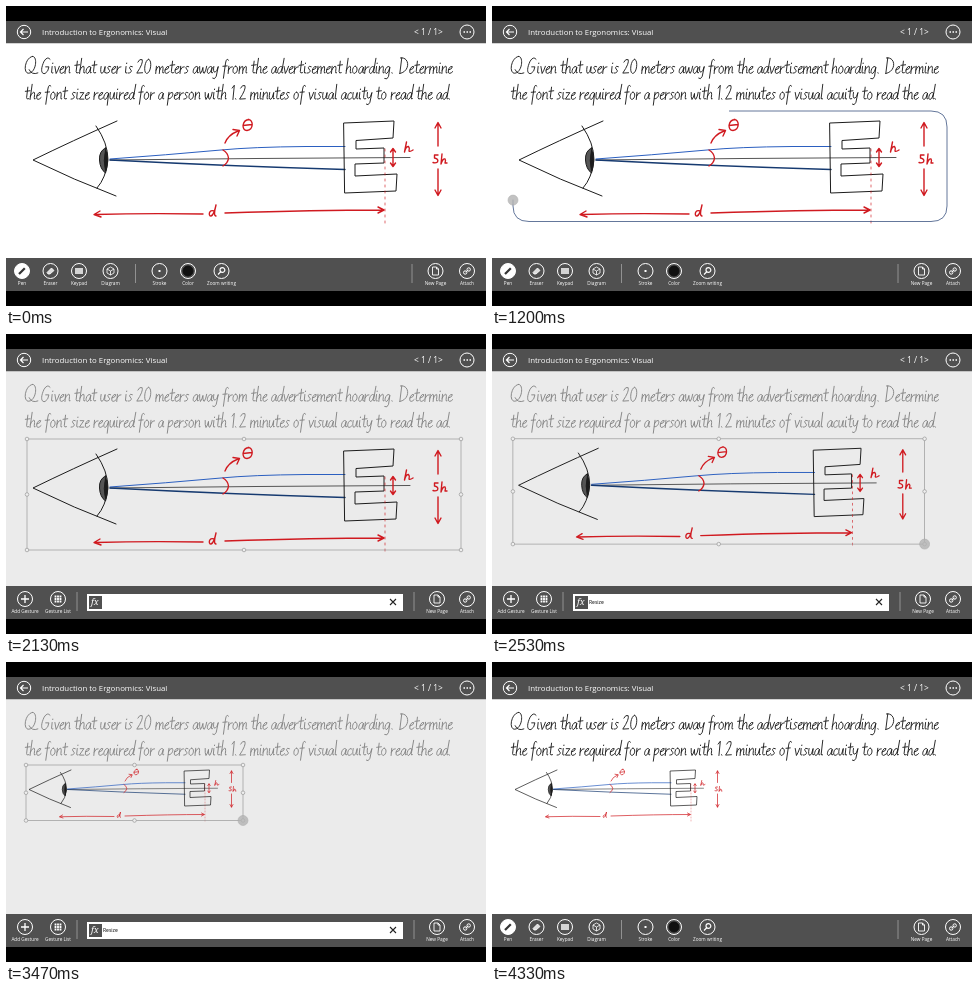
Recreate the animation shown at these times as an HTML page. Size 480 by 300 pixels, loop 4390 ms.

```html
<!DOCTYPE html>
<html lang="en">
<head>
<meta charset="utf-8">
<title>Ergonomics lesson</title>
<style>
html, body { margin: 0; height: 100%; overflow: hidden; background: #000; }
svg { display: block; width: 480px; height: 300px; font-family: "Open Sans", "Noto Sans", sans-serif; }
.ink { fill: none; stroke: #1c1c1c; stroke-linecap: round; stroke-linejoin: round; }
.label { fill: #fff; font-size: 4.7px; text-anchor: middle; }
.line { fill: none; stroke: #fff; }
.red { stroke: #d01a20; stroke-width: 1.4; }
</style>
</head>
<body>
<svg viewBox="0 0 480 300">
  <rect id="page" y="37" width="480" height="216"/>
  <g id="question" class="ink" role="img"></g>
  <g id="diagram" class="ink">
    <path d="M111 115Q66 135 27 154Q68 174 110 190M90 120Q102 137 102 154Q100 172 91 182"/>
    <path d="M99.500 142Q93 145 93.500 154Q94 163 99.500 167Q103.500 155 99.500 142Z" fill="#555"/>
    <path d="M99.500 144Q103 154 99.500 165Q97 155 99.500 144Z" fill="#1c1c1c"/>
    <path d="M104 154L250 152.500L404 151.500" stroke="#555"/>
    <path d="M104 153Q160 149 215 144Q246 141 300 140.500H339" stroke="#2b5fc0"/>
    <path d="M104 154Q220 160 339 163.500" stroke="#163a70" stroke-width="1.400"/>
    <path d="M338 117L388 115L387 132L350 134.500V143L378 142V157L349 158V170L391 168L390 185L339 187Z"/>
    <g class="red">
      <path d="M217 144Q222 147 222.500 152Q222 157 217 160M219 137Q222 129 232 125M227 123.500L233.500 124.500L231 130"/>
      <path d="M243 113.500C236 114 235 124.500 241 124.500C247.500 124 248 113.500 242 113.500M237 119.500L246 118.500"/>
      <path d="M387 143V160M384.500 146L387 142.500L389.500 146M384.500 157L387 160.500L389.500 157"/>
      <path d="M400.500 136L398.500 146Q400 140 402.500 140.500Q404 142 403 145Q404 146 407 144"/>
      <path d="M432 140V117M429 122L432 116.500L435 122M432 163V189M429 184L432 189.500L435 184"/>
      <path d="M432 149H428.500V152Q433 153 431.500 156Q429.500 157.500 427 156.500M436 148L435 158Q437 152 439 153Q440 154 439 157L441 157"/>
      <path d="M197 208Q140 207 89 208.500M94 205L88 208.500L95 211M219 207Q310 204 376 204M372 201L378 204L372 207"/>
      <path d="M208 205C203 203 202 210 205 210Q208 209 210 199Q207 210 210 210"/>
      <path d="M379 143V217" stroke-dasharray="2 4" stroke-width="1" opacity=".65"/>
    </g>
  </g>
  <path id="lasso" fill="none" stroke="#304a7a" d="M237 105H439Q455 105 455 121V200Q455 215.500 439 215.500H37Q21 215.500 21 200V121Q21 105 37 105H240"/>
  <g id="selection" fill="#eee" stroke="#999" stroke-width=".7"></g>
  <circle id="touch" r="5" fill="#b4b4b4" stroke="#a2a2a2" stroke-width=".6" opacity=".8"/>

  <path d="M0 0H480V15H0ZM0 285H480V300H0Z"/>
  <path d="M0 15H480V37.300H0ZM0 252H480V285H0Z" fill="#505050"/>
  <g class="line">
    <circle cx="18" cy="26" r="6.700"/>
    <path d="M22 26H14.500M17.500 23L14.500 26L17.500 29" stroke-width="1.200"/>
    <circle cx="461" cy="26" r="7"/>
    <path d="M457.500 26H465" stroke-width="1.500" stroke-dasharray="1.500"/>
  </g>
  <text x="36" y="28.500" fill="#fff" font-size="7.850">Introduction to Ergonomics: Visual</text>
  <text x="408" y="28.800" fill="#fff" font-size="8.400">&lt; 1 / 1&gt;</text>
  <g id="penBar"></g>
  <g id="gestureBar"></g>
</svg>
<script>
const $ = id => document.getElementById(id);
const set = (id, attrs) => { for (const k in attrs) $(id).setAttribute(k, attrs[k]); };
const ramp = (t, a, b) => Math.min(1, Math.max(0, (t - a) / (b - a)));

// Handwriting: each letter is [advance, stroke]; the baseline is y = 0.
const bowl = 'M4.6-6.5Q2.8-9 1-5.2C-.2-2 .8.6 2.4-.2Q4-1.6 4.6-6.5';
const arch = 'M.6-3.5Q2.5-8.6 4-7.4Q4.6-6 4.4-2Q4.4.4 5.4-.6';
const letters = {
  ' ': [3.3, ''],
  '.': [4, 'M.8-.9L1.1-.3'],
  a: [5.7, bowl + 'L4.4-1.6Q4.6.2 5.6-.8'],
  c: [4.8, 'M4-7Q2.2-8.8.9-5Q0-.2 2.2-.1Q3.4-.3 4.4-1.6'],
  d: [5.7, bowl + 'M5.4-16L4.4-2Q4.4.4 5.6-.8'],
  e: [4.9, 'M.6-3.6Q4.6-5 4-7.2Q2.4-8.6.9-5Q0-.2 2.2-.1Q3.6-.3 4.8-2'],
  f: [5, 'M4.8-14Q2.6-17 2.2-11L1.6 5M0-7.6L4-8'],
  g: [6.2, bowl + 'L4.2 3Q3.4 7 .8 5.4'],
  h: [6, 'M1.2-16L.6 0' + arch],
  i: [3.2, 'M1-7.4V-1.5Q1.2.3 2.4-.6M1.3-11V-10.4'],
  l: [3, 'M1.2-16L1-1.6Q1.2.2 2.4-.6'],
  m: [8.4, 'M.6-7.6V0M.6-3.5Q2.2-8.6 3.6-7.2Q4.2-5 4 0M4-3.5Q5.6-8.6 6.8-7.2Q7.2-5 7-2Q7 .4 8-.6'],
  n: [5.8, 'M.6-7.6V0' + arch],
  o: [5.8, 'M2.6-7.8C-.4-7.6-.2 0 2.4-.1C5.4-.6 5.2-7.8 2.6-7.8'],
  p: [5.6, 'M.8-7.6L.4 6M.6-4Q2.2-8.4 4-7.4C5.6-5 3.6 0 .8-.8'],
  q: [5.6, bowl + 'L4.4 6'],
  r: [4.4, 'M.6-7.6V0M.6-3.6Q2-8 4-7.2'],
  s: [4.6, 'M3.8-7.2Q1.4-8.6 1.2-6.2Q1.6-4.6 3-3.4Q3.8-.6.4-.4'],
  t: [4.6, 'M2-13L1.8-2Q2 .4 4-.8M0-8.6L4.4-9.2'],
  u: [5.8, 'M.6-7.4Q0 0 2.2-.1Q3.8-1 4.4-7.4V-2Q4.6.4 5.6-.8'],
  v: [5, 'M.4-7.4L2.2 0Q3.6-3 4.6-7.6'],
  w: [7.6, 'M.4-7.4Q.6-2 1.8 0Q3.2-2 3.6-6.4Q4 0 5.4-.2Q6.8-3 7-7.6'],
  y: [5.6, 'M.4-7.4Q0-1 2.2-1.4Q4-2.4 4.6-7.4L3.6 3Q2.4 7 .4 5'],
  z: [5.2, 'M.6-7.2H4L.4-.4H4.6'],
  0: [7.5, 'M3.4-15C-.4-14.6-.4 0 3-.1C7-.4 7-15 3.4-15'],
  1: [4, 'M.6-12L2.4-15V0'],
  2: [7, 'M.6-12Q2-16 4.4-14.6Q6-11 .6-.4L6-.8'],
  D: [9.5, 'M1.4-16.5L1 0M.2-16.4C9-18 11-2 1 0'],
  G: [9, 'M7.4-15Q4.6-18.6 2-13C-1-4 .6 1 4 0Q7-2 7-7H4'],
  Q: [12, 'M6-18C-1-17-2 0 4-.3C11-1 11-18.6 6-18M4-4Q7 2 12.5-.6']
};
const wide = 1.065;
function write(text, x, y) {
  let out = '';
  for (const ch of text) {
    const [advance, d] = letters[ch];
    if (d) out += `<path transform="translate(${x} ${y}) scale(${wide} .95) skewX(-5)" d="${d}"/>`;
    x += advance * wide;
  }
  return out;
}
const lines = [
  'Q Given that user is 20 meters away from the advertisement hoarding. Determine',
  'the font size required for a person with 1.2 minutes of visual acuity to read the ad.'
];
$('question').innerHTML = lines.map((s, i) => write(s, 18.5, 67.5 + 26 * i)).join('');
set('question', { 'aria-label': lines.join(' '), 'stroke-width': .9 });

// Toolbars
const icon = (x, label, d, fill = 'none', ink = '#fff', width = 1, body = 'none') =>
  `<g class="line" transform="translate(${x} 265)"><circle r="7.5" fill="${fill}"/>
   <path d="${d}" fill="${body}" style="stroke:${ink};stroke-width:${width}"/></g>
   <text class="label" x="${x}" y="279">${label}</text>`;
const rule = x => `<path d="M${x} 258V277" stroke="#999" stroke-width=".9"/>`;
const pageTools = x =>
  icon(x, 'New Page', 'M-3-4H1L3-2V4H-3ZM1-4V-2H3', 'none', '#fff', .9) +
  icon(461, 'Attach', 'M-3.5 1.5A1.7 1.7 0 1 0-.1 1.5A1.7 1.7 0 1 0-3.5 1.5M0-1.5A1.7 1.7 0 1 0 3.4-1.5A1.7 1.7 0 1 0 0-1.5M-1.5 1L1.5-1');
$('penBar').innerHTML =
  icon(16, 'Pen', 'M-3 3L2.8-2.8', '#fff', '#333', 2.2) +
  icon(44.5, 'Eraser', 'M-3.5 1.5L1-3L3.5-.5L-.5 3H-2.5Z', 'none', '#fff', .8, '#ddd') +
  icon(73, 'Keypad', 'M-4-2H4M-4 0H4M-4 2H4', 'none', '#fff', 1.6) +
  icon(104.5, 'Diagram', 'M0-4L3.5-2V2L0 4L-3.5 2V-2ZM-3.5-2L0 0L3.5-2M0 0V4', 'none', '#fff', .8) +
  rule(129.5) +
  icon(153.5, 'Stroke', 'M-1 0H1', 'none', '#fff', 2) +
  icon(182, 'Color', 'M-5 0A5 5 0 1 0 5 0A5 5 0 1 0-5 0Z', 'none', '#111', 1, '#111') +
  icon(215.5, 'Zoom writing', 'M-1.5-1A2.4 2.4 0 1 0 3.3-1A2.4 2.4 0 1 0-1.5-1M-1 1L-3.5 3.5', 'none', '#fff', 1.2) +
  rule(406) + pageTools(429.5);
const grid = [-2.5, 0, 2.5].map(y => `M-3.4 ${y}H3.4`).join('');
$('gestureBar').innerHTML =
  icon(19, 'Add Gesture', 'M-4 0H4M0-4V4', 'none', '#fff', 1.3) +
  icon(52, 'Gesture List', grid + '" stroke-dasharray="1.8 .7', 'none', '#fff', 1.8) +
  rule(71) +
  `<rect x="81" y="260" width="316" height="17" fill="#fff"/>
   <rect x="83" y="262" width="13" height="13" fill="#505050"/>
   <text x="85" y="271" fill="#fff" font-size="9" font-style="italic" font-family="Noto Serif, serif">fx</text>
   <text id="field" x="97" y="270.3" font-size="5"></text>
   <path d="M384 265L390 271M390 265L384 271" stroke="#222" stroke-width="1.1"/>` +
  rule(408) + pageTools(431);

// Right edge of the selection over time
const drag = [[2400, 455], [2530, 433], [2670, 393], [3000, 300], [3200, 250], [3320, 238]];
function edge(t) {
  let x = drag[0][1];
  for (let i = 1; i < drag.length; i++)
    x += (drag[i][1] - drag[i - 1][1]) * ramp(t, drag[i - 1][0], drag[i][0]);
  return x;
}

const lasso = $('lasso'), total = lasso.getTotalLength();

function draw(t) {
  const dim = ramp(t, 1490, 1600) - ramp(t, 3850, 4100);
  const selected = t >= 1700 && t < 3800;
  const grey = Math.round(255 - 20 * dim);
  set('page', { fill: `rgb(${grey},${grey},${grey})` });
  set('question', { opacity: 1 - .5 * dim });

  const drawn = Math.min(total, Math.max(0, (t - 560) * 1.195));
  set('lasso', {
    'stroke-dasharray': `${drawn} ${total + 9}`,
    opacity: .75 + .25 * dim,
    visibility: t > 560 && t < 1700 ? 'visible' : 'hidden'
  });

  const k = (edge(t) - 21) / 434;
  const x = 21 - 2 * (1 - k), y = 105 - 4 * (1 - k), w = 434 * k, h = 111 * k;
  set('diagram', {
    transform: `translate(${x} ${y}) scale(${k}) translate(-21 -105)`,
    opacity: t < 1700 ? 1 - .55 * dim : 1,
    'stroke-width': 1 / Math.sqrt(k)
  });

  let box = '';
  if (selected) {
    box = `<rect x="${x}" y="${y}" width="${w}" height="${h}" fill="none"/>`;
    for (const u of [0, .5, 1]) for (const v of [0, .5, 1])
      if (u !== .5 || v !== .5) box += `<circle cx="${x + u * w}" cy="${y + v * h}" r="1.8"/>`;
  }
  $('selection').innerHTML = box;

  const tracing = t > 560 && t < 1640, dragging = t > 2350 && t < 3700;
  const tip = tracing ? lasso.getPointAtLength(drawn) : { x: x + w, y: y + h };
  set('touch', { cx: tip.x, cy: tip.y, visibility: tracing || dragging ? 'visible' : 'hidden' });

  const swap = ramp(t, 1720, 1850) - ramp(t, 3850, 4000);
  set('penBar', { opacity: 1 - swap });
  set('gestureBar', { opacity: swap });
  $('field').textContent = 'Resize'.slice(0, Math.floor(6 * ramp(t, 2150, 2400)));
}

const start = performance.now();
function tick() {
  draw((performance.now() - start) % 4390);
  requestAnimationFrame(tick);
}
tick();
</script>
</body>
</html>
```
